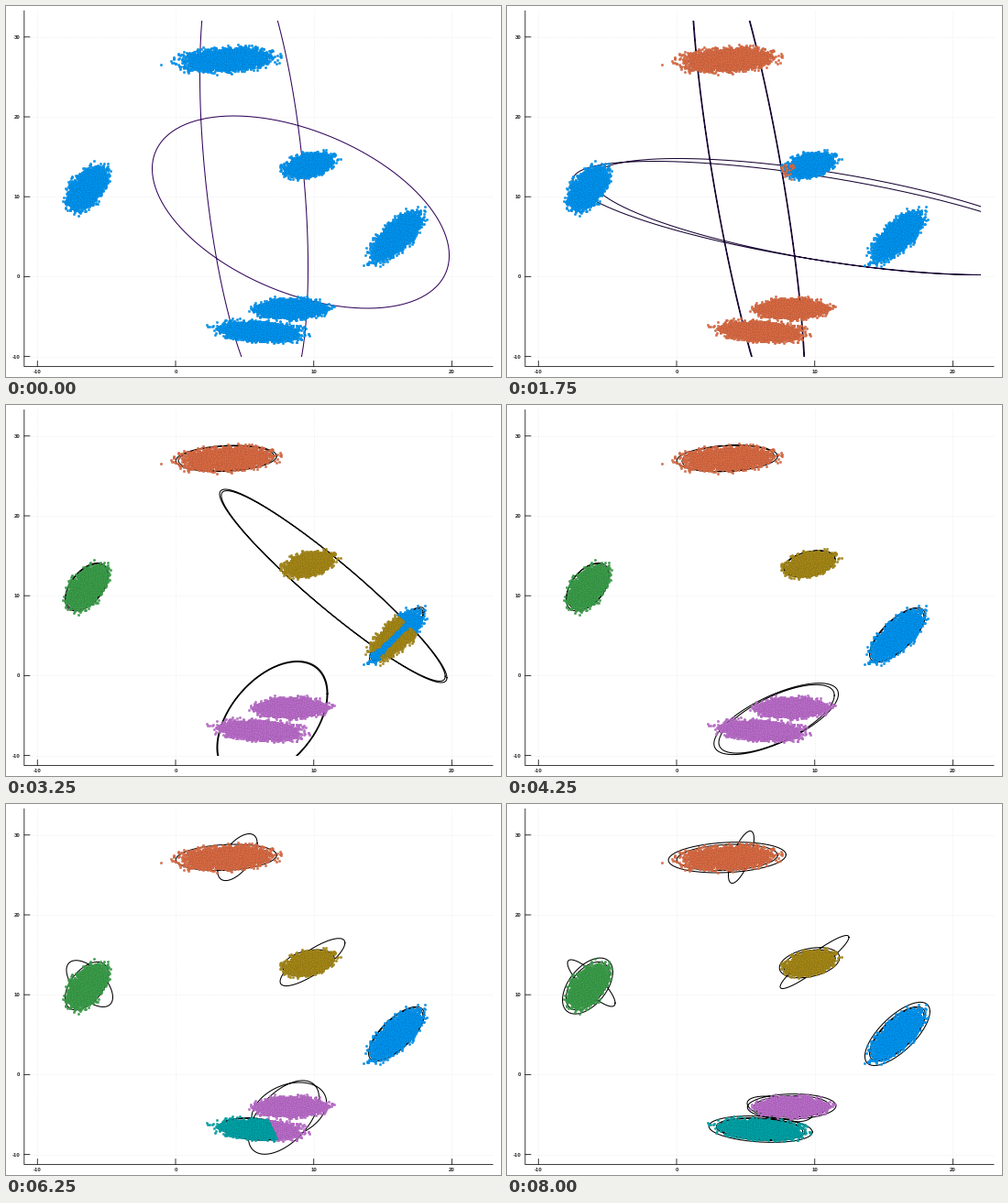
Animation of 540 by 405 pixels, one loop 8250 ms. Source, as a matplotlib script:

```python
import numpy as np
import matplotlib.pyplot as plt
from matplotlib.animation import FuncAnimation
from matplotlib.colors import to_rgb
from matplotlib.patches import Rectangle

W, H, DPI = 540, 405, 100
PX = 72 / DPI
FRAMES, STEP = 33, 250

BLUE, ORANGE, GREEN, PURPLE, OLIVE, TEAL = range(6)
COLORS = ["#009afa", "#e26f46", "#3da44d", "#c271d2", "#ac8d18", "#00a9ad"]

# First frame of each clustering stage.
ONE, TWO, THREE, FIVE, SETTLED, SPLIT, SIX = 0, 3, 8, 12, 15, 23, 27
OUTER_FROM = 29

# Stage pixels: center x, center y, spread x, spread y, correlation.
# Positive correlation rises to the right.
CLOUDS = {
    "top": (240.5, 58.3, 18.5, 4.8, 0.19),
    "mid": (330, 173.2, 9.6, 4.8, 0.33),
    "left": (88, 198.5, 7.8, 8.7, 0.48),
    "right": (426, 251, 10.2, 9.9, 0.7),
    "upper": (310.5, 330.3, 13.8, 3.9, 0.08),
    "lower": (276.5, 355, 16.3, 4.1, -0.22),
}
STRAYS = {"top": (169, 64), "mid": (365, 167), "left": (79, 229),
          "right": (390, 282.5), "upper": (293, 317), "lower": (219, 348)}

# Ellipses that do not follow their points: center x, center y,
# half width, half height, correlation.
SHAPES = {
    ONE: {BLUE: [(321.5, 225, 162, 105, -0.45),
                 (270.5, 180, 59, 256, -0.41)]},
    TWO: {ORANGE: [(263.2, 190, 62.5, 293, -0.787)],
          BLUE: [(350, 230, 257, 63.5, -0.635),
                 (340, 231.5, 268, 62, -0.67)]},
    THREE: {ORANGE: [(249, 100, 67, 269, -0.866),
                     (270.2, 235, 59.2, 265, -0.679)],
            GREEN: [(75, 198, 205, 40.6, -0.857)],
            BLUE: [(408.5, 238, 104.5, 86, -0.9)]},
    FIVE: {OLIVE: [(357, 197.5, 124, 105.5, -0.95)],
           PURPLE: [(290.5, 344.5, 60.5, 65, 0.455)]},
    SETTLED: {},
}
# Where the inner ellipse of a cluster drifts to.
DRIFT = {ORANGE: (255.5, 58, 14, 28.5, 0.7),
         GREEN: (92, 195.5, 26, 25.5, -0.85),
         OLIVE: (335.5, 172.5, 37.5, 29, 0.93)}
DIAGONAL = (301.5, 344, 38.5, 43, 0.6)
SLANTED = (297.5, 333, 35.5, 14, -0.45)


def make_cloud(name, rng, count=6500):
    cx, cy, sx, sy, rho = CLOUDS[name]
    u, v = rng.standard_normal((2, count))
    keep = np.hypot(u, v) < 3.5
    u, v = u[keep], v[keep]
    w = rho * u + np.sqrt(1 - rho**2) * v
    return np.vstack([np.column_stack([cx + sx * u, cy - sy * w]),
                      STRAYS[name]])


rng = np.random.default_rng(7)
POINTS = {name: make_cloud(name, rng) for name in CLOUDS}
NOISE = {name: rng.random(len(p)) for name, p in POINTS.items()}


def assign(frame):
    """Cluster label of each cloud: one number or one per point."""
    lab = dict.fromkeys(CLOUDS, BLUE)
    if frame < TWO:
        return lab
    lab.update(top=ORANGE, upper=ORANGE, lower=ORANGE)
    if frame >= THREE:
        lab["left"] = GREEN
    if frame < FIVE:
        blur = 30 if frame < THREE else 8
        edge = POINTS["mid"][:, 0] + blur * NOISE["mid"]
        lab["mid"] = np.where(edge < 313, ORANGE, BLUE)
        return lab
    lab.update(mid=OLIVE, upper=PURPLE, lower=PURPLE)
    if frame < SETTLED:
        dx, dy = (POINTS["right"] - CLOUDS["right"][:2]).T
        rim = (np.abs(dx + dy) > 6 + 6 * NOISE["right"]) & (dx - dy < 22)
        lab["right"] = np.where(rim, OLIVE, BLUE)
    elif frame >= SIX:
        lab["lower"] = TEAL
    elif frame >= SPLIT:
        x, y = POINTS["lower"].T
        lab["lower"] = np.where(x - 0.5 * (y - 355) < 290, TEAL, PURPLE)
    return lab


def group(frame):
    """Points of every label."""
    lab = assign(frame)
    return [np.vstack([p[np.broadcast_to(lab[n], len(p)) == i]
                       for n, p in POINTS.items()])
            for i in range(len(COLORS))]


def resize(ellipse, k):
    cx, cy, hx, hy, rho = ellipse
    return cx, cy, k * hx, k * hy, rho


def contour(pts):
    """Unit ellipse of the points' mean and covariance."""
    return (*pts.mean(0), *pts.std(0), -np.corrcoef(pts.T)[0, 1])


def drifted(label, ellipse, frame):
    """Inner ellipse, easing from its cluster towards its drift pose."""
    goal = DRIFT.get(label, resize(ellipse, 0.95))
    if label == PURPLE:
        goal = DIAGONAL if frame < SIX else SLANTED
    t = np.clip((frame - SETTLED) / 14, 0, 1)
    ease = t * t * (3 - 2 * t)
    start = np.array(resize(ellipse, 0.95))
    return start + (np.array(goal) - start) * ease


def ellipses(frame, groups):
    shapes = SHAPES[max(s for s in SHAPES if s <= frame)]
    found = []
    for label, pts in enumerate(groups):
        if label in shapes:
            first, *rest = shapes[label]
            found += [first, *(rest or [resize(first, 0.985)])]
        elif len(pts):
            unit = contour(pts)
            main = resize(unit, 3)
            found += [main, drifted(label, main, frame)]
            if frame >= OUTER_FROM:
                found.append(resize(unit, 3.5))
    return found


T = np.append(np.linspace(0, 2 * np.pi, 241), np.nan)


def outline(shapes):
    xs = [cx + hx * np.cos(T) for cx, _, hx, _, _ in shapes]
    ys = [cy - hy * np.sin(T + np.arcsin(r)) for _, cy, _, hy, r in shapes]
    return np.concatenate(xs), np.concatenate(ys)


def to_x(v):
    return 185 + 15.07 * v


def to_y(v):
    return 295.4 - 8.72 * v


fig = plt.figure(figsize=(W / DPI, H / DPI), dpi=DPI, facecolor="white")
ax = fig.add_axes([0, 0, 1, 1])
ax.set(xlim=(0, W), ylim=(H, 0))
ax.axis("off")

# Data range plus a margin of 3 % on each side.
X0, X1 = to_x(-10.96), to_x(22.96)
Y0, Y1 = to_y(33.26), to_y(-11.26)
TICK = 6
font = dict(family="Liberation Sans", weight="bold", size=6 * PX,
            color="#222222")
grid = dict(color="#e6e6e6", lw=0.7 * PX, ls=":", zorder=0)
axis = dict(color="#222222", lw=0.9 * PX, zorder=1, snap=False)
for v in range(-10, 21, 10):
    x = to_x(v)
    ax.plot([x, x], [Y0, Y1], **grid)
    ax.plot([x, x], [Y1 - TICK, Y1], **axis)
    ax.text(x, 399.3, str(v), ha="center", va="center", **font)
for v in range(-10, 31, 10):
    y = to_y(v)
    ax.plot([X0, X1], [y, y], **grid)
    ax.plot([X0, X0 + TICK], [y, y], **axis)
    ax.text(15.5, y, str(v), ha="right", va="center_baseline", **font)
ax.plot([X0, X0, X1], [Y0, Y1, Y1], **axis)

window = Rectangle((to_x(-10), to_y(32)), to_x(22) - to_x(-10),
                   to_y(-10) - to_y(32), transform=ax.transData)
rings, = ax.plot([], [], lw=1.05 * PX, zorder=2)
rings.set_clip_path(window)


def darker(color, k=0.78):
    return tuple(k * c for c in to_rgb(color))


dots = [ax.plot([], [], "o", ms=2.5 * PX, mfc=c, mec=darker(c),
                mew=0.3 * PX, zorder=3 + i)[0]
        for i, c in enumerate(COLORS)]


def update(frame):
    groups = group(frame)
    rings.set_data(*outline(ellipses(frame, groups)))
    rings.set_color("#33065c" if frame < TWO else
                    "#180433" if frame < THREE else "black")
    for line, pts in zip(dots, groups):
        line.set_data(*pts.T)
    return [rings, *dots]


anim = FuncAnimation(fig, update, frames=FRAMES, interval=STEP,
                     repeat=True, repeat_delay=0, blit=False)
plt.show()
```
